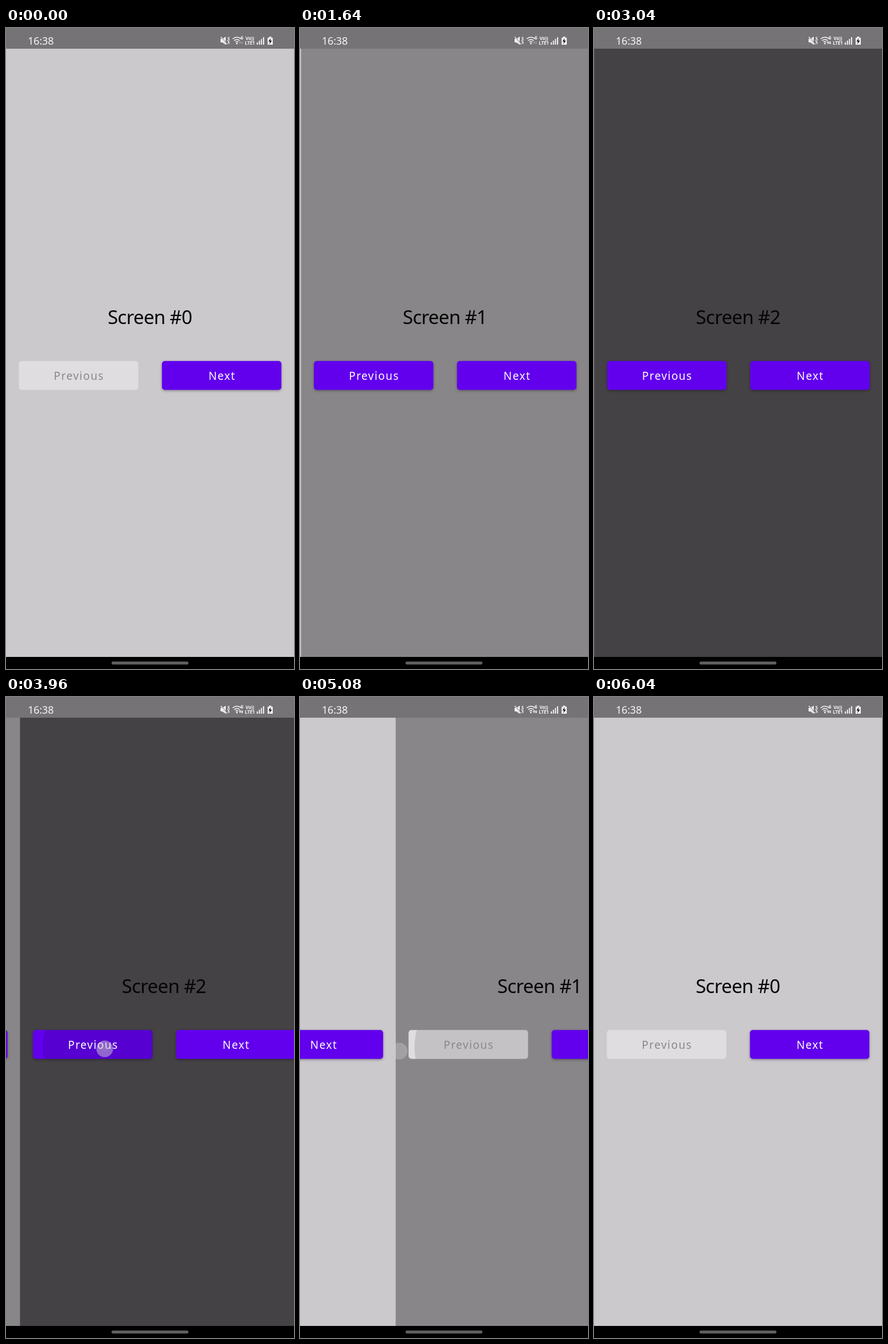
Write an HTML page with a canvas that moves like this. It is 502x1115 px and loops after 6080 ms.

```html
<!DOCTYPE html>
<html lang="en">
<head>
<meta charset="utf-8">
<title>Screen pager</title>
<style>
  html, body { margin: 0; height: 100%; overflow: hidden; background: #000; }
  canvas { display: block; }
</style>
</head>
<body>
<canvas id="stage" width="502" height="1115"></canvas>
<script>
const ctx = document.getElementById('stage').getContext('2d');
const LOOP = 6080, WIDTH = 502, TOP = 36, BOTTOM = 1094;
const DEVICE_WIDTH = 1080;
const BUTTON = { y: 579.2, w: 208.2, h: 50.2, r: 5 };
const PREVIOUS_X = 22.4, NEXT_X = 271.8;
const pageColors = ['#cbc9cc', '#888688', '#444244'];

// Each tap: finger down, start of the slide, page it leaves, direction, finger position
const taps = [
  { down: 920, go: 1094, page: 0, dir: 1, x: 419, y: 607 },
  { down: 2140, go: 2294, page: 1, dir: 1, x: 431, y: 608 },
  { down: 3840, go: 3936, page: 2, dir: -1, x: 172, y: 612 },
  { down: 4943, go: 4997, page: 1, dir: -1, x: 173, y: 616 },
];

const clamp = v => Math.max(0, Math.min(1, v));

// Critically damped spring (stiffness 200), snapped to whole device pixels
function slide(ms) {
  const u = Math.max(0, ms) / 1000 * Math.sqrt(200);
  const rest = (1 + u) * Math.exp(-u);
  return 1 - Math.ceil(DEVICE_WIDTH * rest - 0.3) / DEVICE_WIDTH;
}

// cubic-bezier(.4, 0, .2, 1)
function fastOutSlowIn(x) {
  let lo = 0, hi = 1;
  for (let i = 0; i < 20; i++) {
    const s = (lo + hi) / 2, r = 1 - s;
    if (1.2 * r * r * s + 0.6 * r * s * s + s * s * s < x) lo = s; else hi = s;
  }
  return lo * lo * (3 - 2 * lo);
}

function text(str, x, y, size, color, spacing = 0, align = 'center', weight = 400) {
  ctx.font = `${weight} ${size}px "Noto Sans", sans-serif`;
  ctx.letterSpacing = spacing + 'px';
  ctx.textAlign = align;
  ctx.fillStyle = color;
  ctx.fillText(str, x + (align === 'center' ? spacing / 2 : 0), y);
}

function disc(x, y, r, color) {
  ctx.fillStyle = color;
  ctx.beginPath();
  ctx.arc(x, y, r, 0, 7);
  ctx.fill();
}

function shape(d, color, lineWidth) {
  const path = new Path2D(d);
  if (lineWidth) {
    ctx.strokeStyle = color;
    ctx.lineWidth = lineWidth;
    ctx.stroke(path);
  } else {
    ctx.fillStyle = color;
    ctx.fill(path);
  }
}

function ripple(tap, x, t) {
  const age = clamp((t - tap.down) / 225), grow = fastOutSlowIn(age);
  const alpha = 0.12 * clamp((t - tap.down) / 75) * (1 - clamp((t - tap.go - 225) / 150));
  if (alpha <= 0) return;
  const centerX = x + BUTTON.w / 2, centerY = BUTTON.y + BUTTON.h / 2;
  const startRadius = 0.3 * BUTTON.w;
  const endRadius = Math.hypot(BUTTON.w, BUTTON.h) / 2 + 11;
  ctx.save();
  ctx.clip();
  disc(tap.x + (centerX - tap.x) * age, tap.y + (centerY - tap.y) * age,
    startRadius + (endRadius - startRadius) * grow, `rgba(0,0,0,${alpha})`);
  ctx.restore();
}

function button(label, x, enabled, page, dir, t) {
  ctx.save();
  if (enabled) {
    ctx.shadowColor = 'rgba(0,0,0,.35)';
    ctx.shadowBlur = 4;
    ctx.shadowOffsetY = 1.5;
  }
  ctx.fillStyle = enabled ? '#6200ee' : '#dfdde0';
  ctx.beginPath();
  ctx.roundRect(x, BUTTON.y, BUTTON.w, BUTTON.h, BUTTON.r);
  ctx.fill();
  ctx.restore();
  const tap = taps.find(p => p.page === page && p.dir === dir);
  if (tap) ripple(tap, x, t);
  text(label, x + BUTTON.w / 2, 612, 19, enabled ? '#fff' : '#8a888b', 1.45);
}

function drawPage(i, position, canGoBack, t) {
  ctx.save();
  ctx.translate((i - position) * WIDTH, 0);
  ctx.fillStyle = pageColors[i];
  ctx.fillRect(0, TOP, WIDTH, BOTTOM - TOP);
  text('Screen #' + i, 251, 515, 33, '#050505', -0.7);
  button('Previous', PREVIOUS_X, canGoBack, i, -1, t);
  button('Next', NEXT_X, true, i, 1, t);
  ctx.restore();
}

function drawTouch(tap, t) {
  if (t < tap.down) return;
  const alpha = 0.5 * (1 - clamp((t - tap.go - 60) / 100));
  if (alpha <= 0) return;
  disc(tap.x, tap.y, 14.5, `rgba(205,203,207,${alpha})`);
  disc(tap.x, tap.y, 4, `rgba(150,148,152,${alpha * 0.5})`);
}

function drawSystemBars(t) {
  const white = '#f6f5f6', dim = '#9a989b';
  ctx.fillStyle = '#757376';
  ctx.fillRect(0, 0, WIDTH, TOP);
  text('16:38', 38, 29, 18, white, -0.2, 'left');

  // Muted speaker with vibration mark
  shape('M374 19h3l6-4v14l-6-4h-3z', white);
  shape('M374 14.5l11 14', '#757376', 2.6);
  shape('M374.5 15.5l10 13', white, 1.4);
  shape('M386 16l2 3-2 3 2 3-2 3M389 15l-1 2 1.5 3-1.5 3 1.5 3-1 2', white, 1);

  // Wi-Fi with traffic arrows
  shape('M395 19q7.500-6 15 0M397.500 22q5-4 10 0M400 24.500q2.500-2 5 0', white, 1.5);
  disc(402.5, 27, 1.4, white);
  text('6', 409, 20, 8, white, 0, 'left', 700);
  const arrows = t > 2260 ? white : dim;
  shape('M406 25.500l2-3 2 3h-1.300v2.500h-1.400v-2.500z', arrows);
  shape('M409.500 25.500h1.300v-2.500h1.400v2.500h1.300l-2 3z', arrows);

  text('Vo))', 425, 21, 8, white, -0.2, 'center', 700);
  text('LTE1', 425, 29, 8, white, -0.1, 'center', 700);

  ctx.fillStyle = white;
  for (let i = 0; i < 4; i++) {
    const h = 4 + i * 3;
    ctx.fillRect(437.2 + i * 3.6, 29 - h, 1.9, h);
  }

  // Charging battery
  shape('M456 17h2.500v-2h4v2h2.500v12h-9z', white);
  shape('M461.500 17.500l-4 6h2.500l-.800 4.500 4.300-6h-2.700z', '#111');

  ctx.fillStyle = '#000';
  ctx.fillRect(0, BOTTOM, WIDTH, 1115 - BOTTOM);
  ctx.fillStyle = '#5f5e60';
  ctx.beginPath();
  ctx.roundRect(184, 1102, 134, 5.2, 2.6);
  ctx.fill();
}

function draw(t) {
  let position = 0, current = 0;
  for (const tap of taps) {
    position += tap.dir * slide(t - tap.go);
    if (t >= tap.go) current += tap.dir;
  }
  pageColors.forEach((_, i) => {
    if (Math.abs(i - position) < 1) drawPage(i, position, current > 0, t);
  });
  taps.forEach(tap => drawTouch(tap, t));
  drawSystemBars(t);
}

const start = performance.now();
function tick() {
  draw((performance.now() - start) % LOOP);
  requestAnimationFrame(tick);
}
tick();
</script>
</body>
</html>
```
